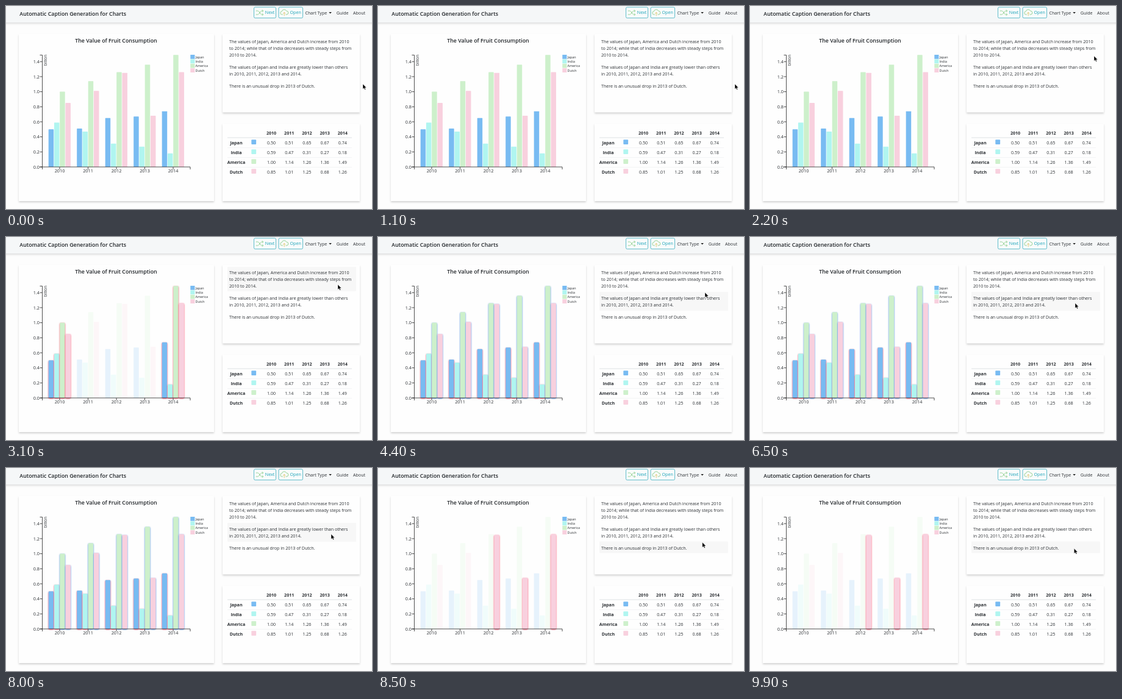
An HTML page that plays this animation: 600 px wide and 333 px high, repeating every 10000 ms.

```html
<!DOCTYPE html>
<html lang="en">
<head>
<meta charset="utf-8">
<title>Automatic Caption Generation for Charts</title>
<style>
  html, body { margin: 0; width: 100%; height: 100%; overflow: hidden; background: #fdfdfd; }
  svg { display: block; width: 100%; height: 100%; }
  text { font-family: "Open Sans", "Noto Sans", sans-serif; font-size: 7.12px; fill: #2b2f33; }
  .head { font-size: 8.84px; font-weight: 600; fill: #212529; }
  .bold { font-weight: 700; }
  .mid { text-anchor: middle; }
  .end { text-anchor: end; }
  .axis { font-size: 7.3px; }
  .key { font-size: 5.4px; }
  .unit { font-size: 6.3px; }
  .button { fill: #17a2b8; }
  .card { fill: #fefefe; filter: drop-shadow(0 2px 1.6px rgba(0, 0, 0, .17)); }
  .line { fill: none; stroke: #222; stroke-width: .8; }
  .icon { fill: none; stroke: #8ccf8b; stroke-width: .9; stroke-linecap: round; stroke-linejoin: round; }
</style>
</head>
<body>
<svg id="stage" viewBox="0 0 600 333" xmlns="http://www.w3.org/2000/svg"></svg>
<script>
const LOOP = 10000, STEP = 100, FADE = 300;
const YEARS = [2010, 2011, 2012, 2013, 2014];
const SERIES = [
  { name: 'Japan', color: '#78bbf2', values: [.50, .51, .65, .67, .74] },
  { name: 'India', color: '#b0f5f0', values: [.59, .47, .31, .27, .18] },
  { name: 'America', color: '#cdf0cb', values: [1.00, 1.14, 1.26, 1.36, 1.49] },
  { name: 'Dutch', color: '#f8d0de', values: [.85, 1.01, 1.25, .68, 1.26] }
];
const CAPTIONS = [
  { top: 49, height: 40, y: 60.6, lines: [
    'The values of Japan, America and Dutch increase from 2010',
    'to 2014; while that of India decreases with steady steps from',
    '2010 to 2014.'] },
  { top: 90, height: 31, y: 102.6, lines: [
    'The values of Japan and India are greatly lower than others',
    'in 2010, 2011, 2012, 2013 and 2014.'] },
  { top: 120.5, height: 19, y: 133.5, lines: ['There is an unusual drop in 2013 of Dutch.'] }
];
const RED = '#ff3d5e', BLUE = '#3f7fe0';

// Each scene returns a glow colour for a bar, '' for plain, or null for dimmed.
const SCENES = [
  { start: 0, caption: -1, mark: () => '' },
  { start: 2300, caption: 0, mark: (s, y) => y === 0 || y === 4 ? RED : null },
  { start: 4000, caption: 1, mark: s => s < 2 ? RED : BLUE },
  { start: 8200, caption: 2, mark: (s, y) => s === 3 && y > 1 ? RED : null }
];
// Pointer tip: time, x, y
const PATH = [
  [0, 585, 128], [1400, 585, 128], [2200, 564, 82], [2900, 544, 78],
  [3700, 544, 78], [4300, 536, 91], [4800, 536, 91], [5800, 533, 108.5],
  [8000, 533, 108.5], [8500, 531.7, 122], [9200, 531.7, 122], [9800, 531.3, 132]
];

const svg = document.getElementById('stage');

function add(tag, attrs, text) {
  const node = document.createElementNS(svg.namespaceURI, tag);
  for (const key in attrs) node.setAttribute(key, attrs[key]);
  if (text !== undefined) node.textContent = text;
  return svg.appendChild(node);
}
const rect = (x, y, width, height, more) => add('rect', { x, y, width, height, ...more });
const label = (x, y, text, cls = '', more) => add('text', { x, y, class: cls, ...more }, text);
const path = (d, more) => add('path', { d, ...more });

const yOf = value => 264 - value * 123.4;
const groupX = i => 88 + i * 46.5;

function drawNavbar() {
  rect(-5, -5, 610, 32, { fill: '#f5f7f8', style: 'filter:drop-shadow(0 1.5px 2px rgba(0,0,0,.18))' });
  label(22.3, 16.2, 'Automatic Caption Generation for Charts', 'head');
  const box = { rx: 2, fill: '#f9fbfb', stroke: '#4db6c6', 'stroke-width': .9 };
  rect(406.5, 2, 36, 17.7, box);
  rect(447, 2, 39.5, 17.7, box);
  label(424.8, 13.4, 'Next', 'button');
  label(465.5, 13.4, 'Open', 'button');
  path('M410 8h2.5c3 0 4 6 7 6h2M410 14h2.5c3 0 4-6 7-6h2M420 6.5l1.7 1.5l-1.7 1.5M420 12.5l1.7 1.5l-1.7 1.5', { class: 'icon' });
  path('M453.5 14h-1a2.6 2.6 0 0 1-.2-5.2a3.9 3.9 0 0 1 7.4-.6a2.9 2.9 0 0 1 .4 5.8h-1.2', { class: 'icon' });
  path('M456.2 16v-5.5m-1.8 1.8l1.8-1.8l1.8 1.8', { class: 'icon', style: 'stroke:#e3c873' });
  label(490.5, 14, 'Chart Type');
  path('M529.3 10h4.6l-2.3 2.5z', { fill: '#222' });
  label(541.8, 14, 'Guide');
  label(569, 14, 'About');
}

function drawCards() {
  for (const [x, y, w, h] of [[21, 46, 320, 274], [355, 46, 225, 128.5], [355, 193, 225, 127]])
    rect(x, y, w, h, { class: 'card' });
}

function drawChart() {
  label(180.5, 60.3, 'The Value of Fruit Consumption', 'head mid');
  const bars = [];
  SERIES.forEach((series, s) => series.values.forEach((value, y) => {
    const top = yOf(value);
    const node = rect(groupX(y) + (s - 2) * 9.25 + .2, top, 8.5, 264 - top, { fill: series.color });
    bars.push({ node, s, y });
  }));
  path('M55.5 80.5H59.5V264H55.5M59.5 268V264H302V268', { class: 'line' });
  for (let i = 0; i < 8; i++) {
    const y = yOf(i / 5);
    path(`M55.5 ${y}h4`, { class: 'line' });
    label(55, y + 2.6, (i / 5).toFixed(1), 'axis end');
  }
  YEARS.forEach((year, i) => {
    path(`M${groupX(i)} 264v4`, { class: 'line' });
    label(groupX(i), 273.4, year, 'axis mid');
  });
  label(0, 0, 'billion', 'unit end', { transform: 'translate(66.8 80) rotate(-90)' });
  SERIES.forEach(({ name, color }, i) => {
    rect(302.3, 80 + i * 7.4, 7.2, 6.8, { fill: color });
    label(310.5, 85.6 + i * 7.4, name, 'key');
  });
  return bars;
}

function drawCaptions() {
  return CAPTIONS.map(({ top, height, y, lines }) => {
    const back = rect(363, top, 211, height, { fill: '#f7f7f7', rx: 1 });
    lines.forEach((line, i) => label(366, y + i * 11.2, line));
    return back;
  });
}

function drawTable() {
  const columnX = i => 435 + i * 29.2;
  YEARS.forEach((year, i) => label(columnX(i), 210.8, year, 'bold mid'));
  rect(363, 215.6, 204, .8, { fill: '#d5d9dd' });
  SERIES.forEach(({ name, color, values }, row) => {
    const y = 227 + row * 16;
    if (row) rect(363, y - 11, 204, .5, { fill: '#e6e8ea' });
    label(377.5, y, name, 'bold mid');
    rect(402.3, y - 7.8, 7.8, 7.8, { fill: color, rx: 1 });
    values.forEach((value, i) => label(columnX(i), y, value.toFixed(2), 'mid'));
  });
}

drawNavbar();
drawCards();
const bars = drawChart();
const backs = drawCaptions();
drawTable();
const pointer = path('M0 0V8.2L1.9 6.5L3.2 9.3L4.6 8.7L3.3 6H5.8Z', { fill: '#000', stroke: '#fff', 'stroke-width': .4 });

const mix = (a, b, k) => a + (b - a) * k;
const smooth = k => k * k * (3 - 2 * k);
const opacity = mark => mark === null ? .18 : 1;

function pointerAt(t) {
  const i = PATH.findIndex(key => key[0] > t);
  if (i < 0) return PATH[PATH.length - 1].slice(1);
  const [t0, x0, y0] = PATH[i - 1], [t1, x1, y1] = PATH[i];
  const k = smooth((t - t0) / (t1 - t0));
  return [mix(x0, x1, k), mix(y0, y1, k)];
}

function render(t) {
  let index = 0;
  while (index + 1 < SCENES.length && SCENES[index + 1].start <= t) index++;
  const scene = SCENES[index], before = SCENES[Math.max(0, index - 1)];
  const k = Math.min(1, (t - scene.start) / FADE);
  for (const { node, s, y } of bars) {
    const glow = scene.mark(s, y);
    node.style.opacity = mix(opacity(before.mark(s, y)), opacity(glow), k);
    node.style.filter = glow ? `drop-shadow(.8px 1.5px .8px ${glow})` : 'none';
    node.setAttribute('rx', glow ? 1.4 : .6);
  }
  backs.forEach((back, i) => { back.style.opacity = i === scene.caption ? 1 : 0; });
  pointer.setAttribute('transform', `translate(${pointerAt(t)})`);
}

const begin = performance.now();
function tick() {
  const t = (performance.now() - begin) % LOOP;
  render(Math.floor(t / STEP) * STEP);
  requestAnimationFrame(tick);
}
tick();
</script>
</body>
</html>
```
